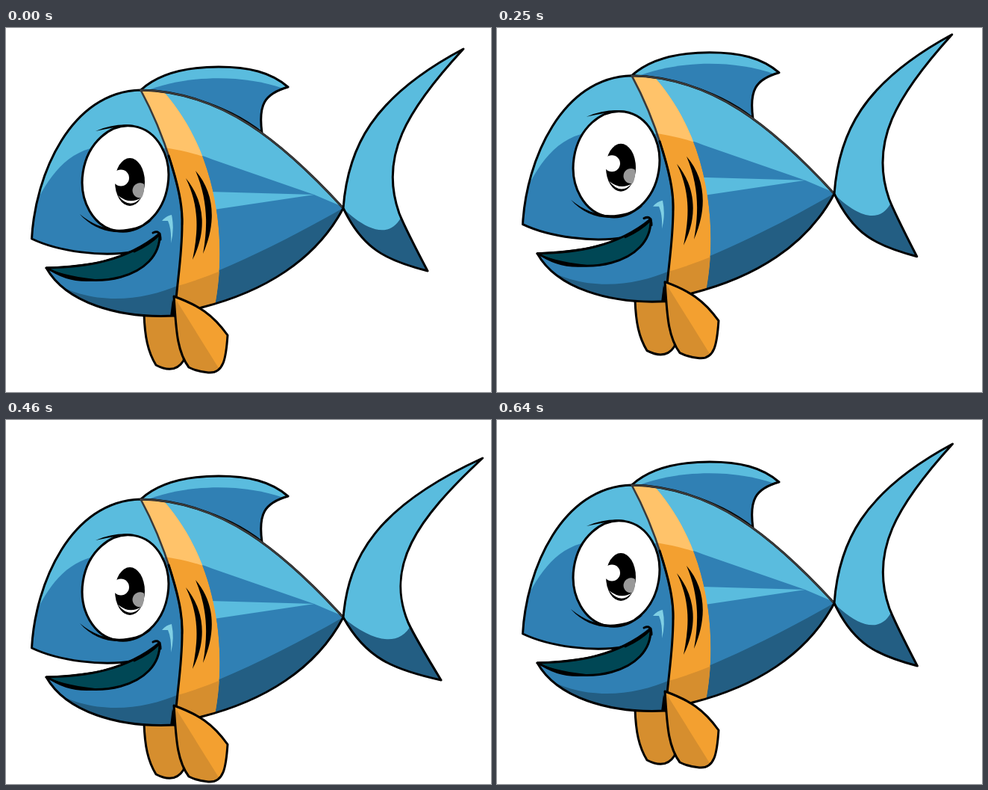
Animation, 650 px wide and 487 px high, one loop 670 ms. Source, as an HTML page:

```html
<!DOCTYPE html>
<html lang="en">
<head>
<meta charset="utf-8">
<title>Swimming fish</title>
<style>
html, body { margin: 0; width: 100%; height: 100%; overflow: hidden; background: #fff; }
svg { display: block; }
path, ellipse, circle { vector-effect: non-scaling-stroke; }
.line { fill: none; stroke: #000; stroke-width: 3; stroke-linejoin: round; stroke-linecap: round; }
.soft { stroke: #3a3a3a; stroke-width: 2.6; }
.light { fill: #5abcde; }
.mid { fill: #3080b4; }
.dark { fill: #235e83; }
.gold { fill: #f3a030; }
.amber { fill: #d68e2e; }
</style>
</head>
<body>
<svg width="650" height="487" viewBox="0 -1 650 487">
<defs>
  <path id="body" d="M34.5 281C39 195 87 84 180.5 82C289 84 369 150 452 240C415 310 345 352 262 373L226 384C150 388 80 366 54 320C110 318 150 311 185 290L172 298C130 306 70 298 34.5 281Z"/>
  <path id="tail" d="M452 240C458 160 490 92 613 27C536 110 500 172 527 247Q535 267 565 324C510 310 478 295 452 240Z"/>
  <path id="dorsal" d="M180.5 82C210 55 255 51 285 51C325 51 355 58 378 78C346 87 338 102 343 139Q280 90 180.5 82Z"/>
  <path id="band" d="M180.5 82C213 142 237 220 236 262C236 305 229 340 226 384L280 370C294 300 291 175 212 85Z"/>
  <path id="fin" d="M225 358C258 370 277 382 297 410C295 440 292 462 271 460Q257 459 245 453C228 430 228 398 225 358Z"/>
  <clipPath id="inBody"><use href="#body"/></clipPath>
  <clipPath id="inTail"><use href="#tail"/></clipPath>
  <clipPath id="inDorsal"><use href="#dorsal"/></clipPath>
  <clipPath id="inBand"><use href="#band"/></clipPath>
  <clipPath id="inFin"><use href="#fin"/></clipPath>
</defs>
<g id="fish">
  <!-- pelvic fin, far side -->
  <path class="line" style="fill:#d68e2e" d="M185 382C186 412 190 432 201 450Q226 463 238 444L240 430L226 380Z"/>

  <g clip-path="url(#inDorsal)">
    <use href="#dorsal" class="light"/>
    <path class="mid" d="M185 84C240 62 315 60 372 80L390 150H185Z"/>
  </g>
  <use href="#dorsal" class="line"/>

  <g clip-path="url(#inBody)">
    <use href="#body" class="mid"/>
    <path class="light" d="M30 255C50 210 75 162 130 157L215 160Q250 164 277 175L413 222L460 242V60H30Z"/>
    <path class="light" d="M272 218L413 222L272 243Z"/>
    <path class="dark" d="M50 331C110 373 180 365 232 343L286 323C340 300 400 270 460 235V400H50Z"/>
    <g clip-path="url(#inBand)">
      <use href="#band" class="gold"/>
      <path fill="#ffc36a" d="M170 70H280V177Q250 164 205 158Z"/>
      <path class="amber" d="M220 347Q260 336 295 321V390H220Z"/>
    </g>
  </g>
  <use href="#body" class="line"/>
  <path class="line soft" d="M180.5 82C213 142 237 220 236 262"/>
  <path class="line" d="M218 170C230 207 237 235 236 262C236 305 229 340 226 384"/>
  <path class="line soft" d="M180.5 82C289 84 369 150 452 240"/>

  <!-- gills -->
  <path d="M241 200C266 230 270 270 250 309C258 270 259 237 241 200Z"/>
  <path d="M254 190C280 220 282 260 264 301C271 262 270 228 254 190Z"/>

  <!-- mouth -->
  <path class="line" style="fill:#004755" d="M54 320C105 319 160 312 206 274C208 334 115 354 54 320Z"/>
  <path d="M54 320Q85 344 130 336Q82 332 54 320Z"/>
  <path class="line" d="M172 298Q192 289 205 276M197 273Q207 268 207 282"/>
  <path fill="#80d0e4" d="M209 257Q215 250 222 249Q226 268 221 287Q222 268 217 257Z"/>

  <!-- eye -->
  <ellipse class="line" style="fill:#fff" cx="160" cy="200.5" rx="57.5" ry="71" transform="rotate(9 160 200.5)"/>
  <path d="M120 137Q145 126 172 129Q146 131 120 137Z"/>
  <path d="M99 248C122 275 165 282 196 256C164 274 130 274 99 248Z"/>
  <ellipse cx="166" cy="205" rx="20" ry="32"/>
  <circle fill="#fff" cx="154" cy="199.5" r="11"/>
  <path fill="#999" d="M185 208A10 10 0 1 0 182 226Q186 218 185 208Z"/>
  <path fill="#fff" d="M150 223Q166 236 181 226Q166 243 150 223Z"/>

  <!-- pelvic fin, near side -->
  <path d="M223 362L220 385H229Z"/>
  <g clip-path="url(#inFin)">
    <use href="#fin" class="gold"/>
    <path class="amber" d="M225 358L285 454L270 480H210Z"/>
  </g>
  <use href="#fin" class="line"/>

  <g id="tailMove">
    <g clip-path="url(#inTail)">
      <use href="#tail" class="light"/>
      <path class="dark" d="M440 228C475 267 514 287 531 249L590 340H440Z"/>
    </g>
    <use href="#tail" class="line"/>
  </g>
</g>
</svg>
<script>
const get = id => document.getElementById(id);
// [step, value] keys
const lift = [[0, 0], [4, -24], [5, -25], [6, -19.3], [9, -2], [13, 23], [14, 27], [15, 21], [17, 11.5], [19, 4]];
const stretch = [[0, 1], [3, .863], [6, .98], [9, 1.07], [13, 1.16], [17, .985], [19, .985]];

function sample(keys, x) {
  const n = Math.max(1, keys.findIndex(k => k[0] >= x));
  const [x0, y0] = keys[n - 1], [x1, y1] = keys[n];
  return y0 + (y1 - y0) * (x - x0) / (x1 - x0);
}

const start = performance.now();
function draw() {
  const t = (performance.now() - start) % 670;
  const step = t < 100 ? 0 : Math.floor((t - 70) / 30);
  get("fish").setAttribute("transform", `translate(0 ${sample(lift, step)})`);
  get("tailMove").setAttribute("transform", `translate(452 0) scale(${sample(stretch, step)} 1) translate(-452 0)`);
  requestAnimationFrame(draw);
}
draw();
</script>
</body>
</html>
```
